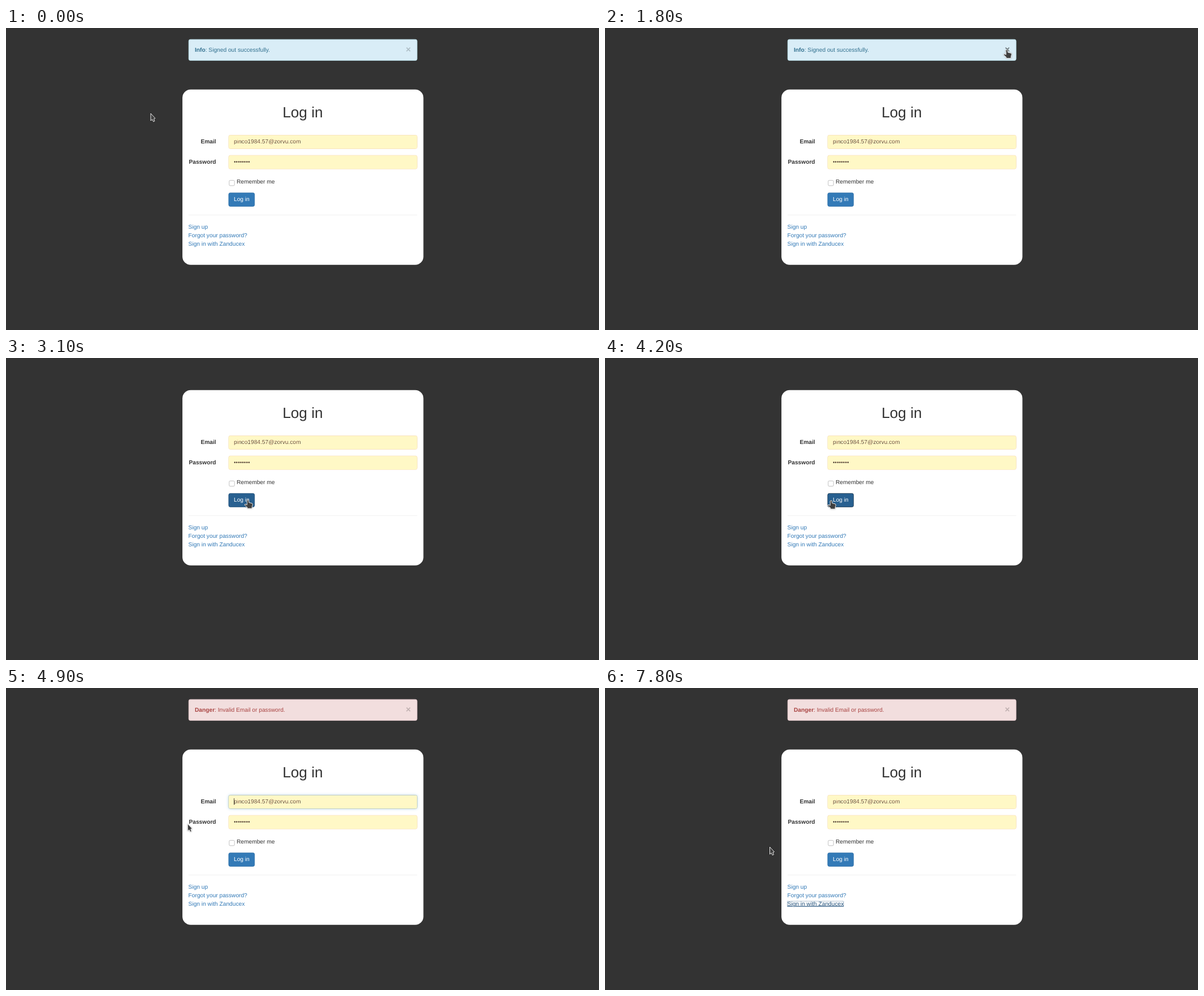
Recreate the animation shown at these times as an HTML page. Size 1049 px wide and 534 px high, loop 8000 ms.

```html
<!DOCTYPE html>
<html lang="en">
<head>
<meta charset="utf-8">
<title>Log in</title>
<style>
  html, body { margin: 0; width: 100%; height: 100%; overflow: hidden; background: #333; }
  svg { display: block; width: 100vw; height: 100vh; }
  text { font: 10.2px "Liberation Sans", Arial, sans-serif; fill: #333; text-rendering: geometricPrecision; white-space: pre; }
  .b { font-weight: bold; }
  h1, .title { font-size: 26.2px; }
  rect, line { stroke-width: .73; }

  #alert rect { fill: #d9edf7; stroke: #bce8f1; }
  #alert text { fill: #31708f; }
  #alert.danger rect { fill: #f2dede; stroke: #ebccd1; }
  #alert.danger text { fill: #a94442; }
  #alert #close { font-size: 15.3px; font-weight: bold; fill: #000; opacity: .2; }
  #alert #close.hover { opacity: .5; }

  .field { filter: grayscale(21%) brightness(88%) contrast(161%) invert(10%) sepia(40%) saturate(206%); }
  .field rect { fill: #fff; stroke: #ccc; }
  .field text { fill: #555; }
  #glow { stroke: #66afe9; filter: drop-shadow(0 0 2.9px rgba(102, 175, 233, .6)); }
  #field-email #glow { stroke: #66afe9; }

  #button rect { fill: #337ab7; stroke: #2e6da4; }
  #button text { fill: #fff; }
  #button.hover rect { fill: #286090; stroke: #204d74; }
  #button.focus rect { fill: #286090; stroke: #122b40; }
  #button.press rect { fill: #204d74; stroke: #122b40; }

  .link { fill: #337ab7; }
  .link.hover, .link.focus { fill: #23527c; text-decoration: underline; }
  #outline { fill: none; stroke: #23527c; stroke-dasharray: .8 .8; }

  #status rect { fill: #f1f1f1; stroke: #c4c4c4; }
  #status text { font: 9.67px "Noto Sans", "Open Sans", sans-serif; fill: #2b2b2b; }

  #pointer { filter: drop-shadow(.4px .8px .8px rgba(0, 0, 0, .35)); }
  #pointer path { fill: #3f3f3f; stroke: #fff; stroke-width: .9; stroke-linejoin: round; }
  #pointer #beam { fill: none; stroke: #333; }
</style>
</head>
<body>
<svg viewBox="0 0 1049 534" preserveAspectRatio="none">
  <rect width="1049" height="534" fill="#333"/>

  <g id="alert">
    <rect x="323.2" y="20.2" width="404" height="37.2" rx="2.9"/>
    <text x="334" y="42"><tspan class="b" id="level"></tspan><tspan id="message"></tspan></text>
    <text id="close" x="711.6" y="42.8" text-anchor="middle">×</text>
  </g>

  <g id="card">
    <rect x="312.1" y="108.8" width="426.3" height="310" rx="14.6" fill="#fff"/>
    <text class="title" x="524.9" y="158.3" text-anchor="middle">Log in</text>

    <text class="b" x="371.6" y="204" text-anchor="end">Email</text>
    <g class="field" id="field-email">
      <rect x="393.9" y="189.4" width="333.4" height="24" rx="2.9"/>
      <rect id="glow" x="393.9" y="189.4" width="333.4" height="24" rx="2.9"/>
      <text x="403" y="204">pinco1984.57@zorvu.com</text>
      <rect id="caret" x="403" y="195" width=".8" height="11.5" style="fill:#333;stroke:none"/>
    </g>

    <text class="b" x="371.6" y="240" text-anchor="end">Password</text>
    <g class="field">
      <rect x="393.9" y="225.2" width="333.4" height="24" rx="2.9"/>
      <text x="403" y="240">••••••••</text>
    </g>

    <rect x="394.8" y="269.4" width="9.4" height="9.4" rx="1.8" fill="#fff" stroke="#aaa"/>
    <text x="408" y="275.3">Remember me</text>

    <g id="button">
      <rect x="393.9" y="291.4" width="45.8" height="24" rx="2.9"/>
      <text x="403" y="305.9">Log in</text>
    </g>

    <line x1="323" x2="727.5" y1="330.7" y2="330.7" stroke="#eee"/>
    <text class="link" id="signup" x="322.6" y="355.4">Sign up</text>
    <text class="link" id="forgot" x="322.6" y="370">Forgot your password?</text>
    <text class="link" id="partner" x="322.6" y="384.6">Sign in with Zanducex</text>
    <rect id="outline" x="322.6" y="377" width="99.4" height="9.3"/>
  </g>

  <g id="status">
    <rect x="-3" y="517.7" width="271" height="20" rx="1.5"/>
    <text x="3" y="530.4"></text>
  </g>

  <g id="pointer">
    <path id="arrow" d="M0 0V12.9L2.9 10.7 4.6 14.6 7 13.6 5.5 9.7 8 8.7Z"/>
    <path id="hand" d="M-1.7 1.4Q0-1 1.7 1.4V5L7 6.4Q8.7 7 8.3 9L7.2 13V15.6H-1.2V13.6L-5.8 9.6Q-6.2 7.6-4 8L-1.7 9.2Z"/>
    <path id="beam" d="M-2-5.5Q0-5.5 0-4.5Q0-5.5 2-5.5M0-4.5V4.5M-2 5.5Q0 5.5 0 4.5Q0 5.5 2 5.5"/>
  </g>
</svg>

<script>
const LOOP = 8000, STEP = 100, LIFT = -52;
const $ = id => document.getElementById(id);
const show = (id, on) => { $(id).style.display = on ? '' : 'none'; };
const flag = (id, name, on) => $(id).classList.toggle(name, on);

// start time, steps, end point, optional bend point
const legs = [
  [100, 5, 417, 44.5],
  [700, 6, 704.5, 35],
  [1500, 4, 711, 38],
  [2000, 5, 439, 168],
  [2700, 5, 428, 250.5],
  [4200, 1, 400, 251.5],
  [4400, 1, 321.3, 240],
  [5600, 1, 299, 190],
  [5700, 1, 391.3, 134],
  [5900, 4, 417, 284, 610, 195],
  [6400, 3, 364.5, 371, 360, 285],
  [6700, 3, 364.5, 378.5],
  [7600, 1, 291.5, 336],
  [7800, 1, 291.5, 281]
];

// name, left, top, right, bottom (card coordinates)
const zones = [
  ['email', 393.5, 189, 727.5, 214],
  ['password', 393.5, 225, 727.5, 250],
  ['button', 393.5, 291, 440, 316],
  ['signup', 322.5, 344.5, 357, 359],
  ['forgot', 322.5, 359, 426, 373.6],
  ['partner', 322.5, 373.6, 422, 388]
];

const smooth = k => k * k * (3 - 2 * k);
const bend = (a, c, b, k) => (1 - k) * (1 - k) * a + 2 * k * (1 - k) * c + k * k * b;

function pointerAt(t) {
  let x = 256, y = 151;
  for (const [t0, n, ex, ey, cx = (x + ex) / 2, cy = (y + ey) / 2] of legs) {
    if (t < t0) break;
    const k = smooth(Math.min(1, (Math.floor((t - t0) / STEP) + 1) / n));
    [x, y] = [bend(x, cx, ex, k), bend(y, cy, ey, k)];
  }
  return [x, y];
}

function hit(x, y, lift, alertOn) {
  if (alertOn && x > 707 && x < 716 && y > 32 && y < 46) return 'close';
  const zone = zones.find(([, l, top, r, b]) => x > l && x < r && y - lift > top && y - lift < b);
  return zone ? zone[0] : '';
}

function draw(now) {
  const t = now % LOOP;
  const within = (a, b) => t >= a && t < b;
  const closed = within(2000, 4900), failed = t >= 4900;
  const lift = closed ? LIFT : 0;
  const [x, y] = pointerAt(t);
  const over = hit(x, y, lift, !closed);

  show('alert', !closed);
  flag('alert', 'danger', failed);
  $('level').textContent = failed ? 'Danger' : 'Info';
  $('message').textContent = failed ? ': Invalid Email or password.' : ': Signed out successfully.';
  $('card').setAttribute('transform', `translate(0 ${lift})`);

  show('glow', within(4900, 7300));
  $('glow').style.opacity = t < 5100 ? .65 : 1;
  show('caret', within(4900, 5100));

  for (const id of ['close', 'button', 'signup', 'forgot', 'partner']) flag(id, 'hover', over === id);
  flag('button', 'press', within(3500, 3700));
  flag('button', 'focus', within(3700, 4900));
  flag('partner', 'focus', t >= 7300);
  show('outline', t >= 7300);

  show('status', within(4600, 4900) || within(7300, 7600));
  const host = 'facebug-tbenrik.herokuapp.com';
  $('status').lastElementChild.textContent =
    within(4700, 4900) ? 'Read ' + host : `Waiting for ${host}...`;

  const inField = over === 'email' || over === 'password';
  show('beam', inField);
  show('hand', over && !inField);
  show('arrow', !over);
  $('pointer').setAttribute('transform', `translate(${x} ${y})`);
  requestAnimationFrame(draw);
}
requestAnimationFrame(draw);
</script>
</body>
</html>
```
